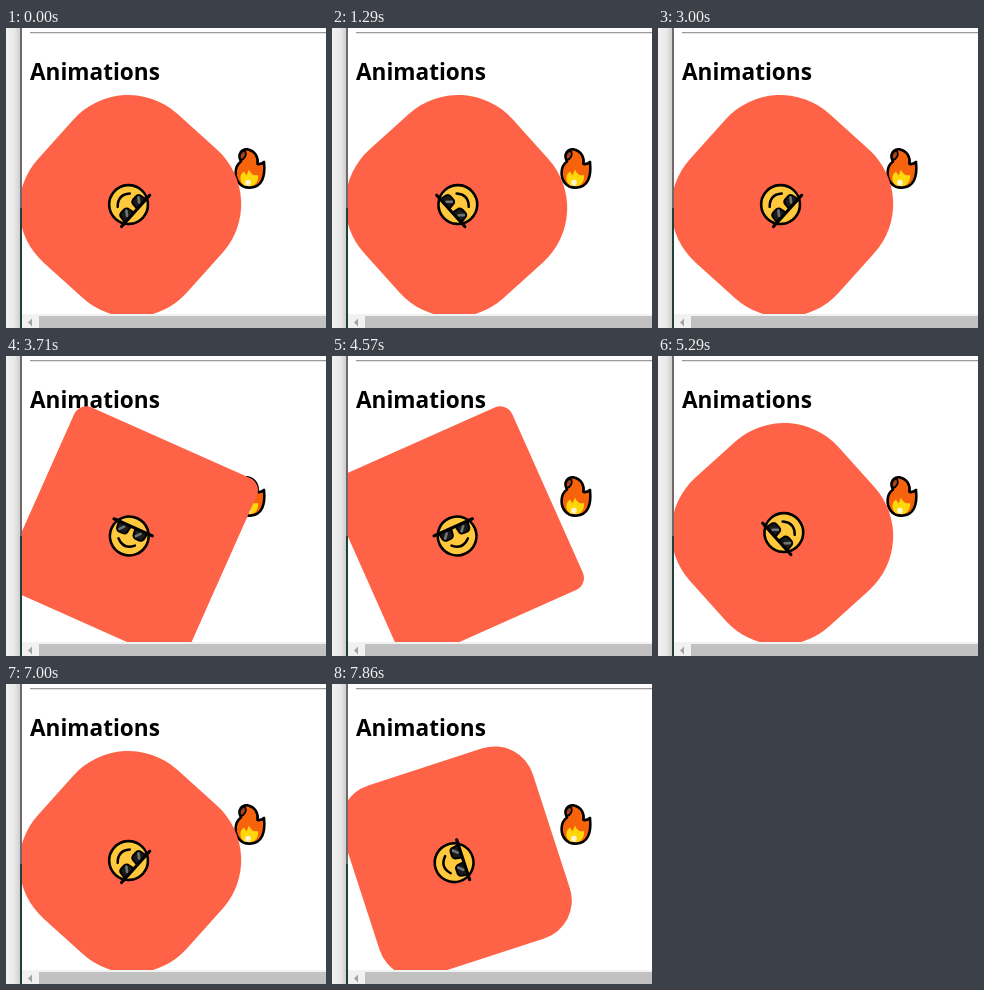
An HTML page for the animation above (8000 ms loop, 320 by 300 pixels).

```html
<!DOCTYPE html>
<html lang="en">
<head>
<meta charset="utf-8">
<title>Animations</title>
<style>
  html, body { margin: 0; width: 100%; height: 100%; overflow: hidden; background: #fff; }
  svg { display: block; width: 320px; height: 300px; }
  text { font: 700 22.6px "Open Sans", "Noto Sans", sans-serif; }
</style>
</head>
<body>
<svg viewBox="0 0 320 300">
  <defs>
    <linearGradient id="gutter">
      <stop offset="0" stop-color="#f1f1f1"/>
      <stop offset=".6" stop-color="#e9e9e9"/>
      <stop offset="1" stop-color="#cfcfcf"/>
    </linearGradient>
    <clipPath id="page"><rect x="15.5" width="305" height="286"/></clipPath>
  </defs>

  <rect width="320" height="300" fill="#fff"/>
  <path d="M24 4.5H320" stroke="#9a9a9a"/>
  <path d="M24 5.5H320" stroke="#e6e6e6"/>
  <text x="24" y="52">Animations</text>

  <g id="fire" stroke-linejoin="round" stroke-linecap="round">
    <path fill="#f7630c" stroke="#000" stroke-width="2.6" d="M242 121.4C249 123 252.500 129 251.500 136Q255.500 136.500 258 134C259.500 149 256 159 244 159.600C234 160 229.600 152 229.600 145C229.600 139 231.500 136 235 133.500C232 129 233.500 124 236.500 122.400Q239 121 242 121.400Z"/>
    <path fill="#a8431a" stroke="#000" stroke-width="1.8" d="M234.500 132C232.500 128 234 124 239 122.500C241 127 239 131 234.500 132Z"/>
    <path fill="#ffd60a" d="M238 157.500C232.500 153 234 146 238 143.500L240.500 147.500L243 141.500C245 146 247 148 252 147C253 153 249 158 244 158.200Z"/>
    <ellipse cx="242" cy="154.800" rx="2.800" ry="3" fill="#fff6d0"/>
  </g>

  <g clip-path="url(#page)">
    <g id="spinner">
      <rect id="box" x="-100" y="-100" width="200" height="200" fill="#ff6347"/>
      <g transform="translate(0 2.200)" stroke-linecap="round" stroke-linejoin="round">
        <circle r="19.400" fill="#ffc83d" stroke="#000" stroke-width="2.600"/>
        <path d="M-9 6.500Q0 15 9 6.500" fill="none" stroke="#000" stroke-width="2.500"/>
        <path d="M-21 -9.500H21" stroke="#000" stroke-width="3.200"/>
        <path id="lens" d="M-15.500 -9H-2.500L-3.500 -2.500Q-4.500 0 -7 0H-11Q-13.500 0 -14.500 -2.500Z" fill="#1b1b1b" stroke="#000" stroke-width="2"/>
        <use href="#lens" x="18"/>
        <path d="M-12 -2.500L-8.500 -6.500M6 -2.500L9.500 -6.500" stroke="#6f7775" stroke-width="2.600"/>
      </g>
    </g>
  </g>

  <rect width="14" height="300" fill="url(#gutter)"/>
  <rect x="14" width="2" height="180" fill="#71686a"/>
  <rect x="14" y="180" width="2" height="120" fill="#213f3d"/>

  <rect x="16" y="286" width="304" height="14" fill="#f1f1f1"/>
  <rect x="33" y="288" width="287" height="12" fill="#c1c1c1"/>
  <path d="M26 290.500V298.500L22 294.500Z" fill="#a3a3a3"/>
</svg>
<script>
  const spinner = document.getElementById('spinner');
  const box = document.getElementById('box');
  const LOOP = 8000, FPS = 7, CAPTURE_FPS = 30;
  const START = 132, STEP = 360 / CAPTURE_FPS;

  // One turn per second, shown at 7 fps from 30 fps samples.
  function render(ms) {
    const shot = Math.floor(((ms % LOOP) + 4.3) * FPS / 1000);
    const sample = Math.floor(shot * CAPTURE_FPS / FPS);
    const angle = (START + STEP * sample) % 360;
    // Square at 0deg, full circle at 180deg.
    const radius = 100 * (1 - Math.abs(angle - 180) / 180);
    spinner.setAttribute('transform', `translate(124.2 178) rotate(${angle})`);
    box.setAttribute('rx', radius);
  }

  const start = performance.now();
  function tick() {
    render(performance.now() - start);
    requestAnimationFrame(tick);
  }
  tick();
</script>
</body>
</html>
```
